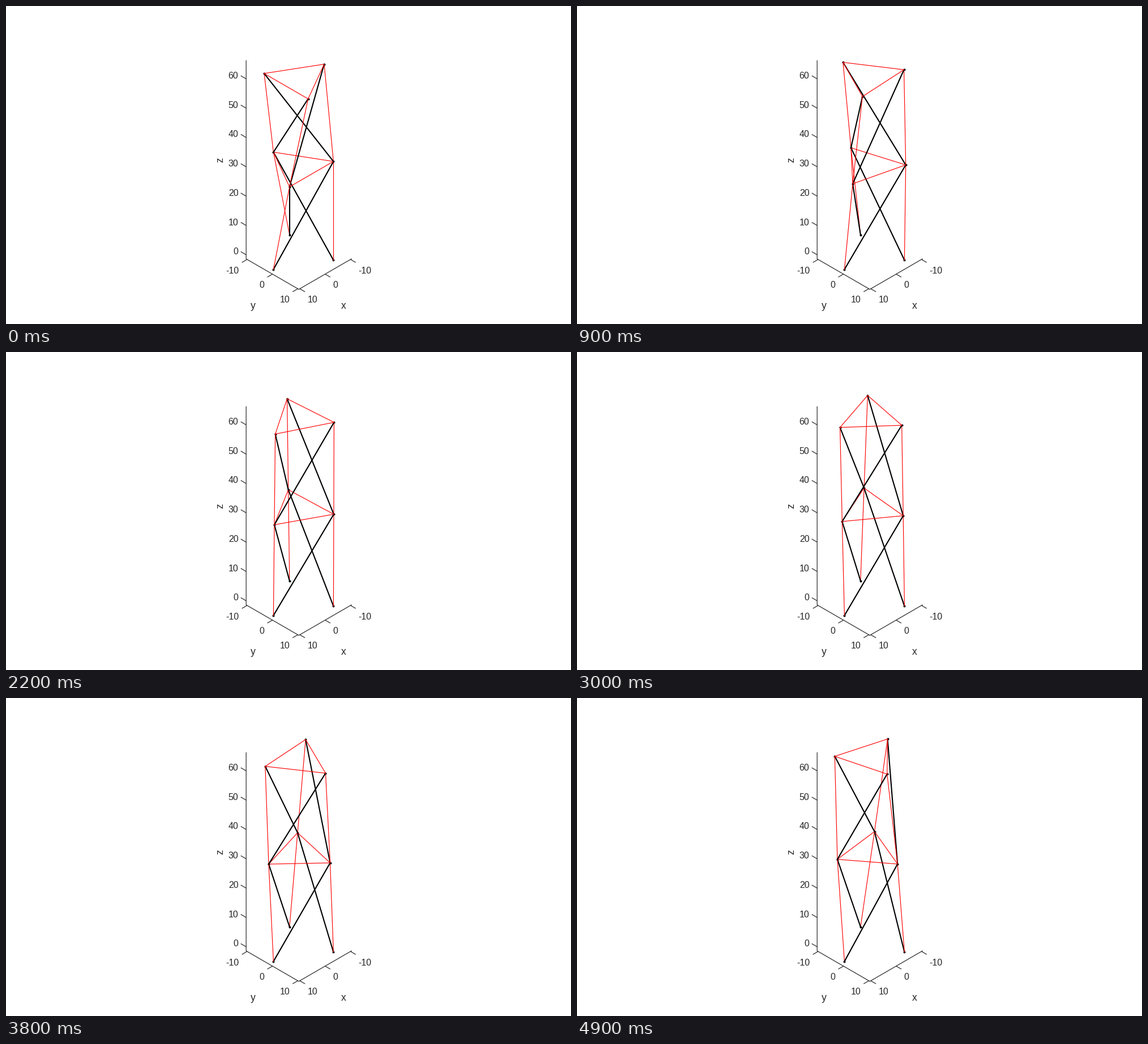
Write a matplotlib script that moves like this. It is 998 px wide and 561 px high and loops after 5000 ms.

```python
import numpy as np
import matplotlib.pyplot as plt
from matplotlib.animation import FuncAnimation

W, H, DPI = 998, 561, 100
PX = 72 / DPI                      # one pixel in points
FRAMES, INTERVAL = 50, 100
CENTER = np.array([517.2, 438.9])  # screen position of the 3D origin
UNIT = 6.336                       # pixels per data unit
SX, SY, SZ = UNIT / np.sqrt(2), UNIT / np.sqrt(6), UNIT * np.sqrt(2 / 3)
LIM, Z_LOW, Z_HIGH = 10.38, -1.4, 66.2
INK = "#262626"
RADIUS, HEIGHT, TWIST = 10, 30, np.radians(150)
ROD_SQ = 2 * RADIUS**2 * (1 - np.cos(TWIST)) + HEIGHT**2


def project(x, y, z):
    """Isometric view along (1, 1, 1)."""
    return np.array([CENTER[0] + SX * (y - x),
                     CENTER[1] + SY * (x + y) - SZ * z])


def ring(radius, angle, z):
    a = angle + np.arange(3) * 2 * np.pi / 3
    return np.column_stack([radius * np.cos(a), radius * np.sin(a), np.full(3, z)])


def tower(i):
    """Three rings of nodes; the rods keep their length while the tower rises."""
    z = HEIGHT + 0.05 * i
    r = RADIUS + 0.000174 * i * (22 - i)
    cos_twist = (RADIUS**2 + r**2 + z**2 - ROD_SQ) / (2 * RADIUS * r)
    turn = np.pi / 6 - (TWIST - np.arccos(cos_twist))
    return np.vstack([ring(RADIUS, 0, 0), ring(r, turn, z), ring(r, 2 * turn, 2 * z)])


fig = plt.figure(figsize=(W / DPI, H / DPI), dpi=DPI, facecolor="white")
ax = fig.add_axes([0, 0, 1, 1])
ax.set(xlim=(0, W), ylim=(H, 0))
ax.axis("off")
plt.rcParams["font.family"] = "Liberation Sans"


def stroke(points, color=INK, width=1.2, **kw):
    xs, ys = np.transpose(points)
    return ax.plot(xs, ys, color=color, lw=width * PX, **kw)[0]


def label(x, y, text, size=16, ha="center", **kw):
    ax.text(x, y, text, fontsize=size * PX, color=INK, ha=ha, va="baseline", **kw)


def tick(p, step, text, offset, ha):
    stroke([p, p + step], solid_capstyle="butt")
    label(*(p + offset), text, ha=ha)


left = project(LIM, -LIM, Z_LOW)
stroke([project(LIM, -LIM, Z_HIGH), left, project(LIM, LIM, Z_LOW),
        project(-LIM, LIM, Z_LOW)], solid_joinstyle="miter")
for v in (-10, 0, 10):
    tick(project(LIM, v, Z_LOW), (-9.2, 5.3), str(v), (-14.2, 24.5), "right")
    tick(project(v, LIM, Z_LOW), (9.2, 5.3), str(v), (13.6, 24.5), "left")
for v in range(0, 61, 10):
    tick(project(LIM, -LIM, v), (-9.5, -5.5), str(v), (-13.8, -0.5), "right")
label(596.5, 533.5, "x", 17.6)
label(436.5, 533.5, "y", 17.6)
label(383, 271.5, "z", 17.6, rotation=90, rotation_mode="anchor")

rods = [(3 * level + k, 3 * level + 3 + (k + 1) % 3)
        for level in (0, 1) for k in range(3)]
cables = [(k, k + 3) for k in range(6)]
cables += [(base + k, base + (k + 1) % 3) for base in (3, 6) for k in range(3)]

origin = [(0, 0), (0, 0)]
links = [(pair, stroke(origin, "black", 2.1)) for pair in rods]
links += [(pair, stroke(origin, "red", 1.15)) for pair in cables]
nodes, = ax.plot([], [], "o", color="black", ms=4 * PX, mew=0, zorder=2)


def draw(i):
    points = tower(i)
    screen = project(*points.T)
    for (a, b), line in links:
        line.set_data(screen[:, [a, b]])
        line.set_zorder(3 + (points[a] + points[b]).sum() / 1000)
    nodes.set_data(screen)
    return [line for _, line in links] + [nodes]


anim = FuncAnimation(fig, draw, frames=FRAMES, interval=INTERVAL,
                     init_func=lambda: draw(0), repeat=True, repeat_delay=0)
plt.show()
```
